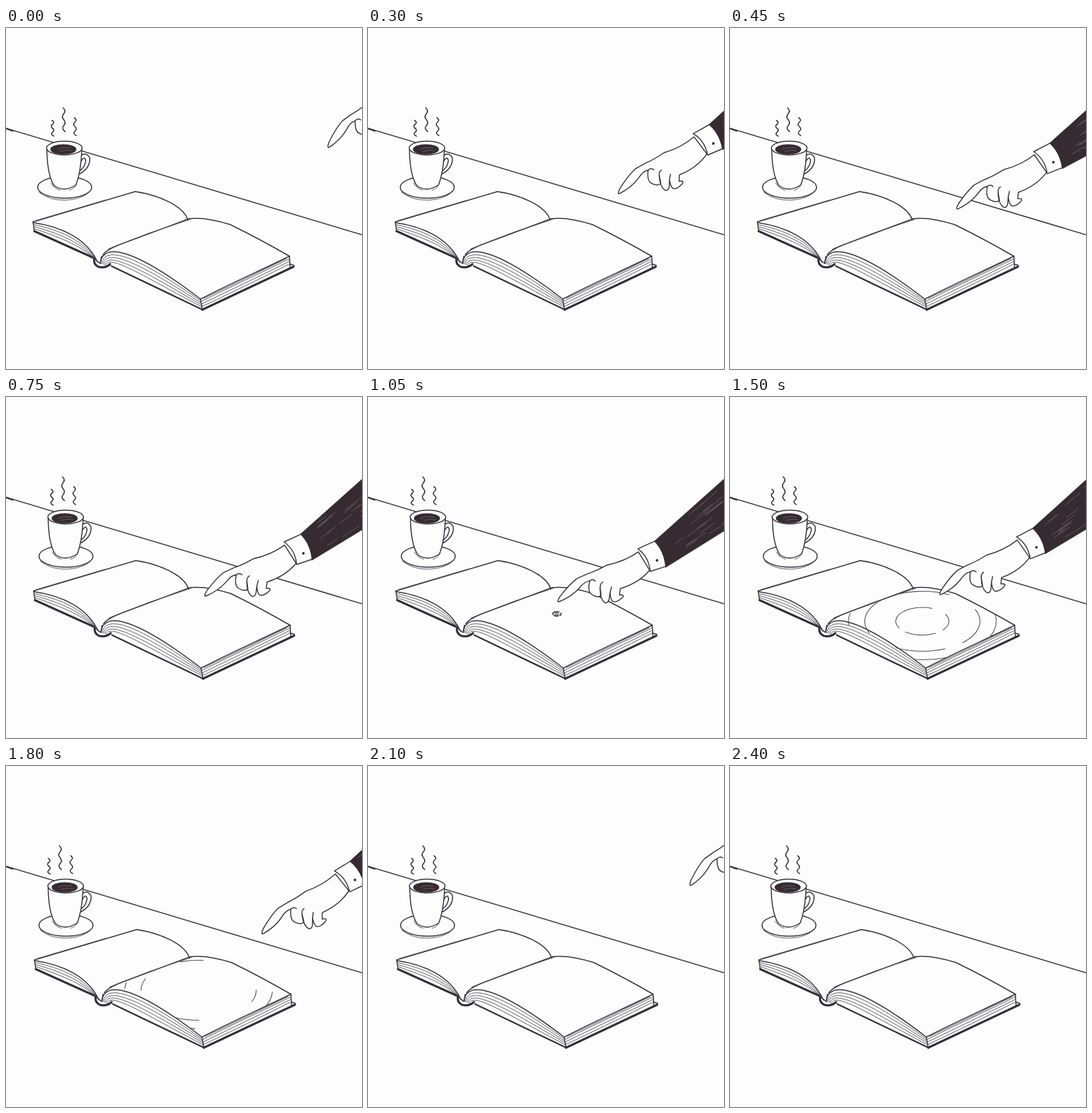
Write an HTML page that moves like this. It is 540 px wide and 517 px high and loops after 2.55 s.

```html
<!DOCTYPE html>
<html lang="en">
<head>
<meta charset="utf-8">
<title>Book and coffee</title>
<style>
  html, body { margin: 0; width: 100%; height: 100%; overflow: hidden; background: #fdfdfe; }
  svg { display: block; width: 100%; height: 100%; }
  .ink { fill: none; stroke: #332d37; stroke-width: 1.5; stroke-linecap: round; stroke-linejoin: round; }
  .paper { fill: #fdfdfe; }
  .thin { stroke-width: .9; stroke: #49434d; }
  .thick { stroke-width: 3.2; }
  .dark { fill: #352b31; }
  .scratch { stroke: #7b7279; stroke-width: .7; }
  .ripple { stroke: #4d4950; stroke-width: 1.1; }
</style>
</head>
<body>
<svg viewBox="0 0 540 517" preserveAspectRatio="none">
  <clipPath id="page">
    <path d="M150 340L278 289Q302 286 340 298Q385 320 430 346L295 411Q205 345 150 340Z"/>
  </clipPath>
  <g class="ink">
    <path d="M-5 150.500L545 315"/>
    <path style="stroke-width:2.200" d="M-5 150.500L10 156"/>

    <g id="cup">
      <ellipse class="paper" cx="89" cy="241.500" rx="41" ry="16.500"/>
      <path class="thin" d="M50 249Q66 262 92 261Q118 259 128 247M68 235Q72 243 82 246M107 236Q104 244 96 246"/>
      <path class="paper" d="M113 194Q122 187 127 197Q128 212 112 221"/>
      <path d="M114 202Q119 193 121 201Q120 210 113 216"/>
      <path class="paper" d="M62 181Q62 222 73 239Q88 250 106 238Q114 218 115 181"/>
      <ellipse class="paper" cx="88.500" cy="182" rx="27" ry="10.500"/>
      <ellipse class="dark" cx="87" cy="184" rx="19" ry="7"/>
      <path class="scratch" d="M78 184Q86 180 98 182M82 187Q92 184 100 186"/>
    </g>
    <path id="steam" style="stroke-width:1.600"/>

    <g id="book">
      <path class="paper" stroke="none" d="M41 295L196 248C230 254 268 270 276 291L430 346L431 362L298 427L160 362Q146 367 134 354L43 308Z"/>
      <path d="M41 294L196 248C230 253 269 269 276 291"/>
      <path d="M147 344Q152 336 176 327L278 289Q302 286 340 298Q385 320 430 346"/>
      <path class="thin" d="M45 292L150 261M155 335L217 311L280 290M300 410L365 379L425 350"/>
      <path d="M41 294L43 308M430 346L431 363M295 411L298 428M437 360L431 358"/>
      <path class="thick" d="M43 308L134 349Q132 358 140 362Q150 365 158 358M298 427L436 362"/>
      <path style="stroke-width:2.400" d="M160 361L298 427"/>
      <path d="M134 350L143 357L145 346"/>
      <g id="edges"></g>
      <path id="ripples" class="ripple" clip-path="url(#page)"/>
    </g>

    <g id="arm">
      <path id="sleeve" class="dark"/>
      <path id="scratches" class="scratch"/>
      <g id="hand">
        <path class="paper" d="M0 1Q-4 2 1 -7Q15 -27 27 -37L43 -45Q57 -50 73 -60Q101 -67 122 -83L141 -55Q125 -34 96 -24L95 -14Q104 -15 100 -10Q91 -1 85 -3Q81 -6 80 -17L79 -6Q77 1 72 -1Q64 -7 64 -25L66 -12Q61 -7 51 -13Q44 -17 47 -34Q39 -33 32 -23Q20 -8 0 1Z"/>
        <path d="M47 -34Q52 -38 56 -34M64 -25Q64 -31 68 -33M80 -17L82 -26"/>
        <path class="paper" d="M121 -88L147 -101Q163 -86 166 -62L142 -53Q139 -76 121 -88Z"/>
        <circle class="dark" cx="152" cy="-71" r="1.300"/>
      </g>
    </g>
  </g>
</svg>

<script>
const STEP = 150, COUNT = 17;
const TOUCH = 8, LEAVE = 14;      // steps at which the finger is furthest in, and last seen
const HAND_SCALE = .96;
const { sin, cos, PI } = Math;
const $ = id => document.getElementById(id);
const set = (id, name, value) => $(id).setAttribute(name, value);
const mix = (a, b, t) => a.map((v, i) => +(v + (b[i] - v) * t).toFixed(1));
const list = (n, make) => Array.from({ length: n }, (_, i) => make(i));

function seeded(seed) {
  return () => (seed = seed * 16807 % 2147483647) / 2147483647;
}

// The paper block: thin curves blended between its upper and lower edge.
function pageEdges(top, bottom, count) {
  return list(count, i => {
    const p = mix(top, bottom, i / count);
    return `<path class="${i ? "thin" : ""}" d="M${p.slice(0, 2)}C${p.slice(2)}"/>`;
  }).join("");
}
$("edges").innerHTML =
  pageEdges([41, 295, 82, 301, 122, 318, 139, 355], [43, 307, 75, 321, 110, 332, 134, 349], 4) +
  pageEdges([143, 357, 147, 322, 200, 338, 295, 411], [153, 360, 160, 348, 205, 383, 298, 426], 5) +
  pageEdges([295, 411, 335, 390, 385, 368, 430, 346], [298, 426, 340, 407, 390, 382, 431, 361], 4);

function drawSteam(step) {
  const sway = 3.5 * cos(2 * PI * (step - 2) / COUNT);
  const wisp = (x, top, height) => {
    const q = height / 4;
    return `M${x + sway - 1} ${top}q5 ${q / 2} 1 ${q}t0 ${q}t0 ${q}t2 ${q}`;
  };
  set("steam", "d", wisp(68, 140, 24) + wisp(85, 121, 36) + wisp(102, 136, 27));
}

// Rings of broken arcs spread over the page, then thin out from the middle.
function drawRipples(step) {
  const grow = Math.min(1, Math.max(0, (step - 6) / 4)) ** 2;
  const fade = Math.max(0, (step - 10) / 3);
  const span = .6 * (1 - fade);
  let d = "";
  if (grow && span > 0) {
    for (const ring of [1, .78, .36].filter(r => r > fade)) {
      const rx = 112 * grow * ring, ry = rx * .52;
      const at = a => `${285 + 5 * grow + rx * cos(a)} ${328 + 12 * grow + ry * sin(a)}`;
      for (const turn of [0, .5, 1, 1.4]) {
        const middle = PI * turn + .25 * ring;
        d += `M${at(middle - span)}A${rx} ${ry} 0 0 1 ${at(middle + span)}`;
      }
    }
  }
  set("ripples", "d", d);
}

// The finger slows toward the page, then draws back on a slightly lower arc.
function handPose(step) {
  const back = Math.max(0, (step - TOUCH) / (LEAVE - TOUCH));
  const reach = back ? 1 - back ** 1.7 : 1 - (1 - step / TOUCH) ** 2.7;
  const sag = sin(PI * back);
  return { x: 490 - 201 * reach, y: 180 + 130 * reach + 10 * sag, angle: -9 + 11.5 * reach - 2 * sag };
}

function drawArm(step) {
  $("arm").style.display = step > LEAVE ? "none" : "";
  if (step > LEAVE) return;
  const { x, y, angle } = handPose(step);
  const c = HAND_SCALE * cos(angle * PI / 180), s = HAND_SCALE * sin(angle * PI / 180);
  const place = (px, py) => [x + px * c - py * s, y + px * s + py * c];
  const top = place(147, -101), bend = place(163, -86), bottom = place(166, -61);
  const farTop = [640, 36], farBottom = [640, 140];
  set("hand", "transform", `translate(${x} ${y}) rotate(${angle}) scale(${HAND_SCALE})`);
  set("sleeve", "d", `M${top}L${farTop}L${farBottom}L${bottom}Q${bend} ${top}Z`);
  const random = seeded(step + 11);
  const scratch = () => {
    const across = .1 + .8 * random(), from = .08 + .45 * random();
    const a = mix(top, bottom, across), b = mix(farTop, farBottom, across);
    return `M${mix(a, b, from)}L${mix(a, b, from + .05 + .1 * random())}`;
  };
  set("scratches", "d", list(18, scratch).join(""));
}

function draw(step) {
  set("cup", "transform", `translate(${2.5 * sin(PI * step / COUNT)} 0)`);
  set("book", "transform", `translate(${.18 * step} 0)`);
  drawSteam(step);
  drawRipples(step);
  drawArm(step);
}

let shown = -1;
function tick() {
  const step = Math.floor(performance.now() / STEP) % COUNT;
  if (step !== shown) draw(shown = step);
  requestAnimationFrame(tick);
}
tick();
</script>
</body>
</html>
```
